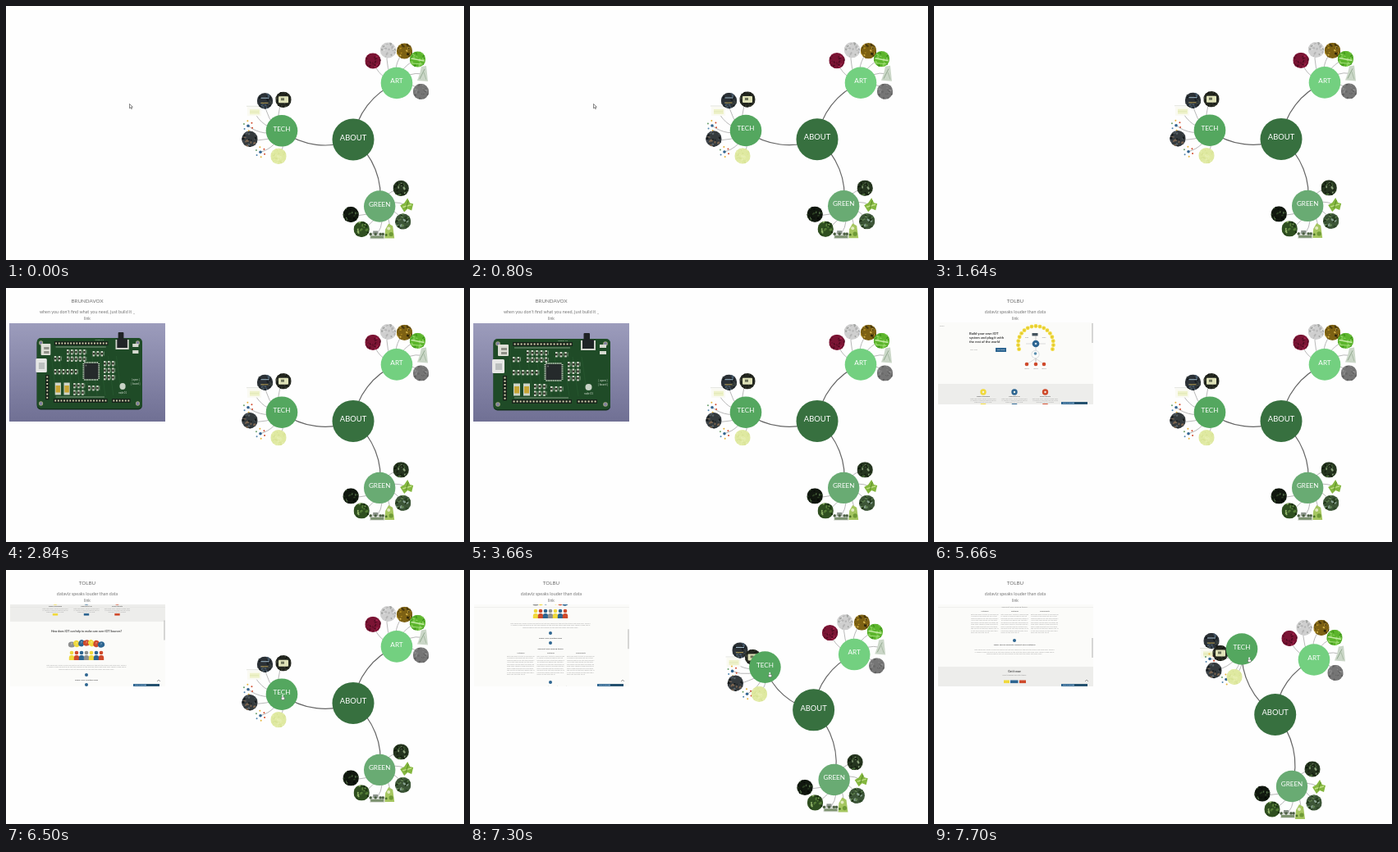
Write an HTML page with a canvas that moves like this. It is 558 px wide and 310 px high and loops after 8 s.

```html
<!DOCTYPE html>
<html lang="en">
<head>
<meta charset="utf-8">
<title>Project map</title>
<style>
html, body { margin: 0; width: 100%; height: 100%; overflow: hidden; background: #fefefe; }
canvas { display: block; width: 100vw; height: 100vh; }
</style>
</head>
<body>
<canvas id="stage"></canvas>
<script>
const W = 558, H = 310, LOOP = 8000;
const canvas = document.getElementById('stage');
const dpr = window.devicePixelRatio || 1;
canvas.width = W * dpr;
canvas.height = H * dpr;
const c = canvas.getContext('2d');

// The picture holds still between these moments.
const STEPS = [0, 400, 800, 1220, 1640, 2040, 2440, 2840, 3240, 3660,
  4060, 4460, 4860, 5260, 5660, 6080, 6500, 6900, 7300, 7700];

const BLUE = '#2d6591', YELLOW = '#f0d93c', RED = '#cf4a2b', GREY = '#8f9090';
const FILLER = 'data from every sensor is read and sent on so that each device can talk with the others ';

const mix = (a, b, k) => a + (b - a) * k;
const clamp = v => Math.max(0, Math.min(1, v));
const ramp = (t, a, b) => clamp((t - a) / (b - a));

function random(seed) {
  let s = seed * 7919 + 17;
  return () => (s = (s * 16807) % 2147483647) / 2147483647;
}

function rect(x, y, w, h, color) {
  c.fillStyle = color;
  c.fillRect(x, y, w, h);
}

function round(x, y, w, h, r, color) {
  c.beginPath();
  c.roundRect(x, y, w, h, r);
  c.fillStyle = color;
  c.fill();
}

function disc(x, y, r, color) {
  c.beginPath();
  c.arc(x, y, r, 0, Math.PI * 2);
  c.fillStyle = color;
  c.fill();
}

function line(x1, y1, x2, y2, color, width) {
  c.beginPath();
  c.moveTo(x1, y1);
  c.lineTo(x2, y2);
  c.strokeStyle = color;
  c.lineWidth = width;
  c.stroke();
}

function shape(points, color) {
  c.beginPath();
  points.forEach(([x, y]) => c.lineTo(x, y));
  c.closePath();
  c.fillStyle = color;
  c.fill();
}

function text(str, x, y, size, color, align = 'center', weight = 400) {
  c.font = `${weight} ${size}px Lato, "Open Sans", sans-serif`;
  c.textAlign = align;
  c.textBaseline = 'middle';
  c.fillStyle = color;
  c.fillText(str, x, y);
}

function paragraph(x, y, rows, chars, align = 'center', gap = 2.5) {
  const source = FILLER.repeat(3);
  for (let i = 0; i < rows; i++) {
    const from = (i * 13) % 60;
    const length = i === rows - 1 ? chars * 0.7 : chars;
    text(source.slice(from, from + length), x, y + i * gap, 2, '#9a9a9a', align);
  }
}

// ---- node tree ----

// A 60 degree arc, clockwise from a to b.
function link(a, b, color, width) {
  const dx = b.x - a.x, dy = b.y - a.y, k = Math.sqrt(3) / 2;
  const cx = (a.x + b.x) / 2 - dy * k, cy = (a.y + b.y) / 2 + dx * k;
  const from = Math.atan2(a.y - cy, a.x - cx);
  c.beginPath();
  c.arc(cx, cy, Math.hypot(dx, dy), from, from + Math.PI / 3);
  c.strokeStyle = color;
  c.lineWidth = width;
  c.stroke();
}

function speckle(x, y, r, base, colors, seed) {
  const rnd = random(seed);
  c.save();
  c.beginPath();
  c.arc(x, y, r, 0, Math.PI * 2);
  c.clip();
  rect(x - r, y - r, r * 2, r * 2, base);
  for (let i = 0; i < 34; i++) {
    c.beginPath();
    c.ellipse(x + (rnd() * 2 - 1) * r, y + (rnd() * 2 - 1) * r,
      0.5 + rnd() * 1.7, 0.4 + rnd(), rnd() * 3, 0, Math.PI * 2);
    c.fillStyle = colors[i % colors.length];
    c.fill();
  }
  c.restore();
}

const photo = (base, ...colors) => (x, y, seed) => speckle(x, y, 9.7, base, colors, seed);

const LOOKS = {
  circuit(x, y, seed) {
    speckle(x, y, 9.7, '#2b3136', ['#14191d', '#46596a', '#3b4240'], seed);
    rect(x - 5, y - 4, 10, 1, '#9fb9c9');
    rect(x - 5, y + 2, 9, 1.2, '#a08d4e');
  },
  screen(x, y, seed) {
    speckle(x, y, 9.7, '#23261f', ['#10120e', '#3c4034'], seed);
    round(x - 6, y - 4, 12, 8, 1, '#dfe2b8');
    rect(x - 3, y - 2, 4, 3, '#6d735a');
  },
  board: photo('#343a3d', '#15191b', '#59646a', '#454b52', '#7b6550'),
  page(x, y) {
    rect(x - 8, y - 5, 17, 11, '#fafaf2');
    rect(x - 5, y - 2, 12, 6, '#eef2c9');
    line(x - 9, y - 6, x + 7, y - 6, '#cfd2c4', 0.6);
    line(x - 5, y + 1, x + 6, y + 1, '#d8dfab', 0.6);
  },
  dots(x, y) {
    disc(x, y, 1.8, '#33648f');
    [RED, '#e6b43b', '#4f83ad', '#6aa06c', '#e6b43b', RED].forEach((color, i) => {
      const a = i * 1.05 + 0.4;
      disc(x + Math.cos(a) * 5.5, y + Math.sin(a) * 6, 1, color);
    });
  },
  lemon: photo('#dfe9a1', '#e6eeb0', '#d7e295'),
  crimson: photo('#7b1434', '#4f0a20', '#a02149', '#650f2a'),
  frost: photo('#cfcfcf', '#b5b5b5', '#e6e6e6', '#a3a5a3'),
  amber: photo('#7d6113', '#2d2409', '#b58f21', '#4a390c', '#d2b14a'),
  meadow(x, y, seed) {
    speckle(x, y, 9.7, '#5cb52c', ['#3f941c', '#83cf55'], seed);
    line(x - 8, y - 1, x + 8, y + 2, '#c4eba4', 1.5);
    line(x - 7, y + 5, x + 6, y + 6, '#a4de7c', 1);
  },
  figure(x, y) {
    shape([[x - 2, y - 9], [x + 4, y - 10], [x + 6, y + 9], [x - 7, y + 8], [x - 4, y]], '#cbd7c8');
    line(x - 4, y + 6, x + 2, y - 6, '#93aa90', 1);
    line(x + 1, y - 2, x + 4, y + 7, '#a9bca5', 1);
  },
  stone: photo('#757575', '#5c5c5c', '#8c8c8c', '#696969'),
  shade: photo('#25351f', '#0f190c', '#476838', '#8aa07a', '#192513'),
  leaf(x, y) {
    shape([[x - 8, y], [x - 3, y - 3], [x + 1, y - 9], [x + 4, y - 3], [x + 8, y - 2],
      [x + 6, y + 6], [x + 1, y + 4], [x - 3, y + 8]], '#84b73f');
    line(x - 5, y + 2, x + 6, y - 1, '#c2e089', 1.4);
    line(x - 1, y + 4, x + 2, y - 6, '#5b8c29', 1);
  },
  moss: photo('#3c5537', '#1c3016', '#5f8050', '#8aa394', '#264020'),
  hill(x, y) {
    shape([[x - 6, y + 9], [x - 5, y - 2], [x - 1, y - 9], [x + 4, y - 6], [x + 6, y + 9]], '#a5c660');
    disc(x - 1, y - 3, 2, '#e2ebc0');
    disc(x + 2, y + 4, 2.6, '#6f9a36');
    disc(x - 4, y + 5, 1.4, '#4e7428');
  },
  house(x, y) {
    rect(x - 9, y - 2, 18, 8, '#dcdfda');
    rect(x - 5, y - 4, 6, 4, '#8b938b');
    rect(x - 8, y + 2, 16, 3, '#7d9270');
    [-8, -2, 4, 7].forEach(d => disc(x + d, y, 1.7, '#4b5f42'));
  },
  wood: photo('#2f4f20', '#14260d', '#567f38', '#8fb368', '#203a15'),
  night: photo('#11180f', '#060906', '#2c4023', '#55734a', '#0c110a')
};

// Resting place, dragged place, and petals as [look, dx, dy, dragged dx, dragged dy].
const HUB = { label: 'ABOUT', at: [423, 163], to: [415.7, 176.5], r: 25.5, color: '#37703f', size: 9.4 };
const NODES = [
  { label: 'TECH', at: [336, 152.3], to: [375, 96.5], r: 19.3, color: '#54a75f', size: 8.1, petals: [
    ['page', -34, -24, -42, 5], ['dots', -41, -6, -39, 12], ['dots', -26, 26, -19, 37],
    ['circuit', -20.5, -36.5, -37, -10], ['screen', 2, -38, -26, 5],
    ['board', -39, 10, -34, 26], ['lemon', -4, 31, -9, 34]] },
  { label: 'ART', at: [476, 94], to: [463, 109.5], r: 19.3, color: '#73d080', size: 8.2, petals: [
    ['crimson', -29, -27, -30, -26], ['frost', -10.5, -40, -12, -39], ['amber', 9.5, -39, 9, -39],
    ['meadow', 25.5, -29, 25, -27], ['figure', 32, -11, 32, -7], ['stone', 29.5, 10.5, 26, 16]] },
  { label: 'GREEN', at: [455.2, 244.5], to: [436, 264], r: 19.2, color: '#69ab73', size: 8.1, petals: [
    ['shade', 26, -22, 25, -21], ['leaf', 33, -1, 33, 1], ['moss', 28.5, 18.5, 27, 20],
    ['hill', 12, 30, 10, 31], ['house', -3, 34, -5, 33], ['wood', -22, 28, -24, 28],
    ['night', -35, 10, -36, 9]] }
];

function place(node, t, drag) {
  const rise = 0.6 * ramp(t, 0, 1640);
  return { x: mix(node.at[0], node.to[0], drag), y: mix(node.at[1] - rise, node.to[1], drag) };
}

function drawNode(node, p) {
  disc(p.x, p.y, node.r, node.color);
  text(node.label, p.x, p.y - 2.2, node.size, '#fff');
}

function drawTree(t, drag) {
  const hub = place(HUB, t, drag);
  const spots = NODES.map(n => place(n, t, drag));
  spots.forEach(p => link(hub, p, '#666', 1.2));
  NODES.forEach((node, i) => {
    const p = spots[i];
    const petals = node.petals.map(([look, x, y, x2, y2]) =>
      ({ look, x: p.x + mix(x, x2, drag), y: p.y + mix(y, y2, drag) }));
    petals.forEach(q => link(p, q, '#9a9a9a', 0.7));
    petals.forEach((q, k) => LOOKS[q.look](q.x, q.y, i * 10 + k + 1));
    drawNode(node, p);
  });
  drawNode(HUB, hub);
}

// ---- side panels ----

function heading(title, line1) {
  text(title, 99, 16.5, 6.3, '#6c6c6c');
  text(line1, 99, 29.3, 5.4, '#777');
  text('link', 99, 37, 5.2, '#777');
}

function pins(x, y, n, gap, down) {
  const length = n * gap + 1;
  rect(x, y, down ? 5 : length, down ? length : 5, '#17231a');
  for (let i = 0; i < n; i++) {
    const d = i * gap + 1.6;
    rect(x + (down ? 1.5 : d), y + (down ? d : 1.5), 2, 2, '#d9d4b2');
  }
}

function parts(x, y, cols, rows) {
  for (let i = 0; i < cols * rows; i++) {
    const px = x + (i % cols) * 5.6, py = y + Math.floor(i / cols) * 8.5;
    rect(px, py, 2.6, 6.4, '#cfd5c8');
    rect(px, py + 2, 2.6, 2.4, '#38382f');
    line(px + 3.9, py + 0.5, px + 3.9, py + 5.5, '#9fb59e', 0.7);
  }
}

function drawBoard(t) {
  const sky = c.createLinearGradient(0, 43, 0, 163);
  sky.addColorStop(0, '#9c9cbc');
  sky.addColorStop(1, '#707094');
  rect(4, 43, 190, 120, sky);

  const turn = Math.sin(ramp(t, 2840, 3660) * Math.PI / 2);
  c.save();
  c.translate(120, mix(-1, 0, turn));
  c.scale(mix(0.9, 1, turn), 1);
  c.translate(-120, 0);
  round(28.5, 63, 142.5, 86.5, 5, '#12301a');
  round(28.5, 62, 142.5, 86, 5, '#1f4b27');
  [[34, 68], [165, 68], [34, 142], [165, 142]].forEach(([x, y]) => {
    disc(x, y, 2.8, '#a9aa82');
    disc(x, y, 1.9, '#7f7fa2');
  });
  for (let i = 0; i < 9; i++) {
    line(48 + i * 11, 84, 55 + i * 11, 132, '#295b32', 0.7);
  }
  pins(52, 66, 18, 4);
  pins(51, 136, 18, 4);
  pins(130, 136, 6, 4);
  pins(40, 107, 7, 4.2, true);
  rect(54, 72.5, 68, 1, '#829a82');
  rect(54, 133.5, 66, 1, '#829a82');
  round(34, 69, 13, 14, 1, '#dedfd6');
  rect(38, 73, 7, 3, '#8f9188');
  rect(38, 78, 7, 3, '#8f9188');
  round(27, 87, 15, 17, 1.5, '#e6e7e5');
  rect(31, 92, 8, 8, '#bcc0bf');
  parts(69, 76, 5, 2);
  parts(52, 100, 6, 1);
  parts(78, 117, 3, 2);
  parts(119, 90, 3, 3);
  parts(104, 78, 3, 1);
  parts(98, 120, 3, 1);
  parts(52, 84, 2, 1);
  [54, 66].forEach(x => {
    rect(x - 1, 116.5, 8, 15, '#cfd5c8');
    rect(x, 120, 6, 8.5, '#c6a433');
  });
  for (let i = 0; i < 9; i++) {
    const d = i * 2.2;
    rect(92.5 + d, 91, 1.1, 23, '#d4d6ce');
    rect(90.5, 93 + d, 23, 1.1, '#d4d6ce');
  }
  rect(92.5, 93, 19, 19, '#252a2b');
  disc(95, 95.5, 0.9, '#777');
  round(138.5, 55, 7.5, 10, 1, '#1f2224');
  rect(135, 64, 18, 12, '#d1d4cc');
  rect(137, 63, 14, 11, '#202426');
  rect(158, 69, 8, 4, '#d6d9d0');
  rect(158, 77, 8, 4, '#d6d9d0');
  disc(144.5, 121, 4, '#c8d3c6');
  text('node 01', 144.5, 129, 3, '#d5dfd3');
  text('[ open ]', 162, 113, 3.4, '#d5dfd3');
  text('[ board ]', 162, 118, 3.4, '#d5dfd3');
  text('version 1.0', 113, 64.6, 2.4, '#d5dfd3');
  c.restore();
}

function drawIntro() {
  ['Build your own IOT', 'system and plug it with', 'the rest of the world'].forEach((s, i) =>
    text(s, 43, 56 + i * 5, 4.1, '#333', 'left', 700));
  text('your mail', 44, 75.5, 2.2, '#999', 'left');
  rect(75, 73, 13, 5, BLUE);
  text('Start now', 81.5, 75.6, 2.2, '#fff');
  text('menu', 7, 46, 2.2, '#999', 'left');

  const cx = 124, cy = 68;
  for (let i = 0; i < 17; i++) {
    const a = Math.PI * (0.9 + i * 1.2 / 16);
    disc(cx + Math.cos(a) * 21.5, cy + Math.sin(a) * 21.5, 2.4, YELLOW);
    disc(cx + Math.cos(a) * 21.5, cy + Math.sin(a) * 21.5, 0.7, '#c9b126');
  }
  line(cx, 58, cx, 90, '#aaa', 0.5);
  line(112, cy, 136, cy, '#bbb', 0.5);
  [113, 124, 134].forEach(x => {
    line(cx, 86, x, 93, '#bbb', 0.5);
    disc(x, 93, 2.3, RED);
    text('device', x, 98, 2, '#888');
  });
  rect(119.5, 55, 7, 3.4, '#44545e');
  text('rules', 113, 60, 2, '#777');
  text('users', 134, 60, 2, '#777');
  disc(cx, cy, 4.3, BLUE);
  disc(cx, cy, 1.3, '#cfe0ea');
  disc(cx - 0.5, 81, 5, '#d5dbde');
  disc(cx - 0.5, 81, 4.3, '#fbfbfa');
  disc(cx - 0.5, 80, 1.8, '#5b8fae');
}

function drawCrowd() {
  const tints = [YELLOW, RED, BLUE, GREY, YELLOW, BLUE, RED];
  tints.forEach((color, i) => {
    const x = 80 + i * 6, y = 179 - Math.sin(i / 6 * Math.PI) * 2;
    c.beginPath();
    c.ellipse(x, y, 4.2, 3.6, i, 0, Math.PI * 2);
    c.fillStyle = tints[(i + 3) % 7];
    c.fill();
    text('?', x, y, 3, '#fff', 'center', 700);
    disc(x, 189, 2.3, color);
    round(x - 3.2, 192, 6.4, 6, [3, 3, 0, 0], color);
  });
}

function drawSite(scroll) {
  c.save();
  c.beginPath();
  c.rect(5, 42, 189, 100);
  c.clip();
  rect(5, 42, 189, 100, '#fbfbf9');
  c.save();
  c.translate(0, -scroll);
  drawIntro();

  rect(5, 117, 189, 34, '#ededeb');
  [[60, YELLOW, 'Open hardware'], [98, BLUE, 'Connect it all'], [135.5, RED, 'Share results']].forEach(([x, color, s]) => {
    disc(x, 127, 3.7, color);
    disc(x, 127, 1.2, '#f4f0e4');
    text(s, x, 132.8, 2.3, '#555', 'center', 700);
    paragraph(x, 135, 3, 36, 'center', 2.2);
    rect(x - 3.2, 141, 6.4, 2.6, color);
  });

  text('How does IOT can help to make care over IOT Sources?', 98, 163, 3.5, '#444', 'center', 700);
  drawCrowd();
  paragraph(98, 204, 3, 112);
  disc(98, 216, 2, BLUE);
  text('Share your solution now', 98, 222, 2.6, '#555', 'center', 700);
  disc(98, 228, 2, BLUE);

  text('Connect and sharing teams', 98, 235, 2.6, '#555', 'center', 700);
  ['Network', 'Platform', 'Community'].forEach((s, i) => {
    const x = 45 + i * 36.5;
    text(s, x + 17, 240.5, 2.3, '#666', 'center', 700);
    paragraph(x, 244, 10, 38, 'left');
  });
  disc(98, 276, 2, BLUE);
  text('Open source projects support each platform', 98, 281.3, 2.6, '#555', 'center', 700);
  paragraph(98, 287.5, 3, 112);

  rect(5, 308, 189, 24, '#ededeb');
  text('Get it now', 98, 314, 3.3, '#444', 'center', 700);
  text('read the guide and start today', 98, 318.5, 2.2, '#888');
  rect(85, 324.5, 7, 3.6, YELLOW);
  rect(93, 324.5, 9.5, 3.6, BLUE);
  rect(104, 324.5, 8, 3.6, RED);
  c.restore();

  rect(192.4, 43 + scroll / 190 * 40, 1.2, 24, '#bdbdbd');
  if (scroll > 0) {
    line(184, 136, 186, 134, '#777', 0.7);
    line(186, 134, 188, 136, '#777', 0.7);
    line(5, 45.5, 194, 45.5, '#e2e2e0', 0.5);
  }
  rect(155, 139, 32, 3, BLUE);
  rect(171, 139, 16, 3, '#24516f');
  text('leave a message', 157, 140.6, 2, '#fff', 'left');
  c.restore();
}

// ---- pointer ----

function drawArrow(x, y) {
  const pts = [[0, 0], [0, 5.4], [1.3, 4.3], [2.2, 6.2], [3, 5.8], [2.1, 4], [3.8, 3.8]];
  shape(pts.map(([a, b]) => [x + a, y + b]), '#fff');
  c.strokeStyle = '#555';
  c.lineWidth = 0.7;
  c.stroke();
}

function drawHand(x, y) {
  round(x - 0.7, y - 2.6, 1.6, 5, 0.8, '#fff');
  round(x - 1.6, y, 4, 3.4, 1.2, '#fff');
  c.strokeStyle = '#333';
  c.lineWidth = 0.5;
  c.stroke();
}

function draw(now) {
  const t = STEPS.filter(s => s <= now).pop();
  const drag = t < 7300 ? 0 : t < 7700 ? 0.6 : 1;
  c.setTransform(canvas.width / W, 0, 0, canvas.height / H, 0, 0);
  rect(0, 0, W, H, '#fefefe');

  if (t >= 4860) {
    heading('TOLBU', 'dataviz speaks louder than data');
    drawSite(88 * ramp(t, 5660, 6500) + 102 * ramp(t, 6900, 7700));
  } else if (t >= 2840) {
    heading('BRUNDAVOX', 'when you don\'t find what you need, just build it _');
    drawBoard(t);
  }

  drawTree(t, drag);
  if (t < 1220) drawArrow(150.5, 119.5);
  if (t >= 6500) drawHand(mix(337, 384, drag), mix(155, 109, drag));
}

const start = performance.now();
function tick() {
  draw((performance.now() - start) % LOOP);
  requestAnimationFrame(tick);
}
tick();
</script>
</body>
</html>
```
